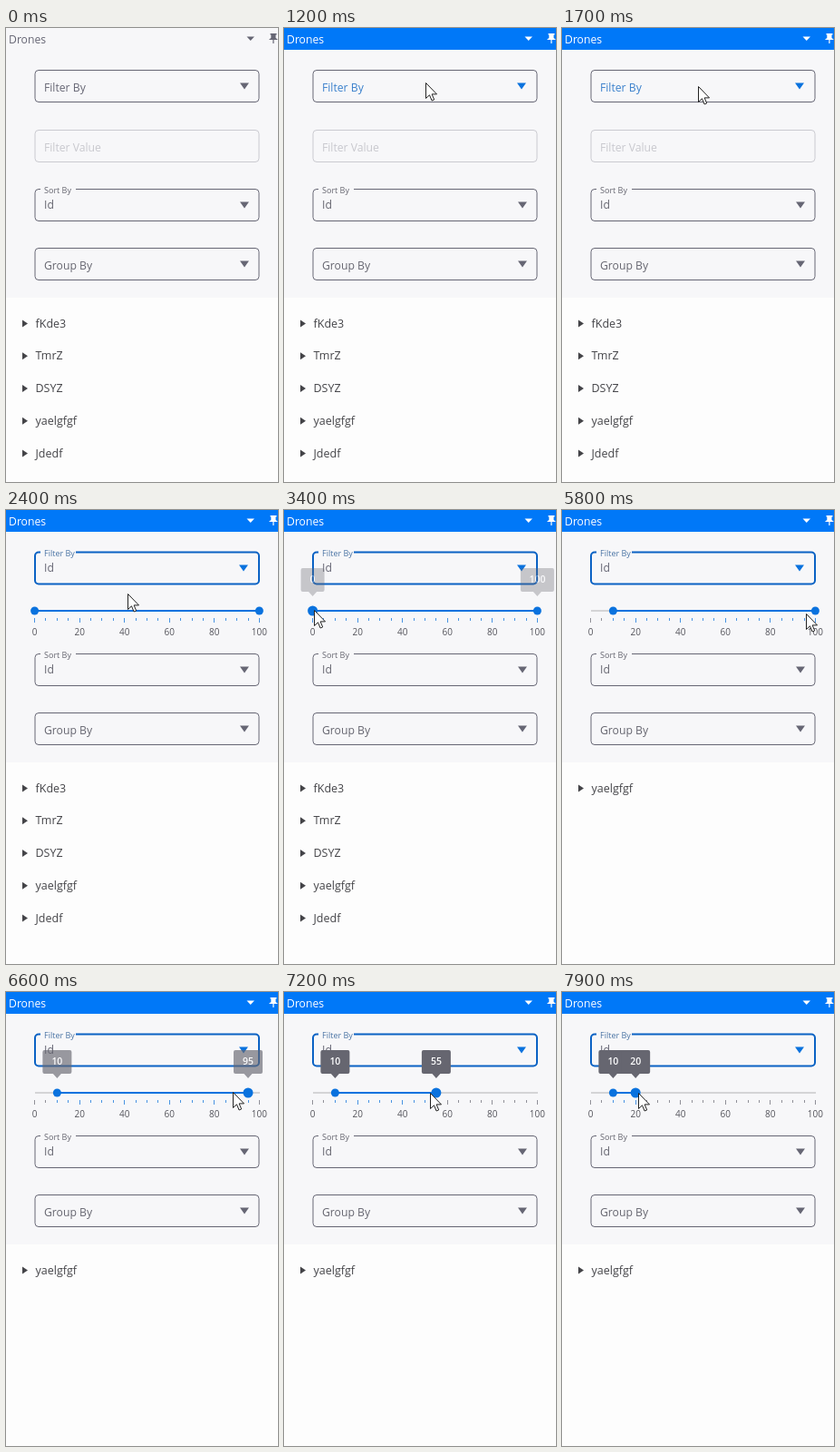
Animation of 300x500 px, one loop 8000 ms. Source, as an HTML page:

```html
<!DOCTYPE html>
<html lang="en">
<head>
<meta charset="utf-8">
<title>Drones panel</title>
<style>
  html, body { margin: 0; width: 100%; height: 100%; overflow: hidden; background: #fdfdfd; }
  svg { display: block; width: 300px; height: 500px; }
  text { font: 12.2px "Open Sans", "Noto Sans", sans-serif; fill: #666670; }
  .small { font-size: 9px; }
  .axis { font-size: 10px; text-anchor: middle; fill: #55555c; }
  .tip text { font-size: 10.5px; font-weight: 600; text-anchor: middle; fill: #fff; }
  .tree text { font-size: 12.5px; }
  .tree text, .tree path { fill: #444448; }
</style>
</head>
<body>
<svg id="stage" viewBox="0 0 300 500"></svg>
<script>
const LOOP = 8000, STEP = 100;
const BLUE = '#0078f8', ACCENT = '#0a72de', INK = '#666674', PANEL = '#f7f7f9';
const stage = document.getElementById('stage');

function add(parent, tag, attrs = {}, content = '') {
  const el = document.createElementNS('http://www.w3.org/2000/svg', tag);
  parent.append(el);
  el.textContent = content;
  return set(el, attrs);
}
function set(el, attrs) {
  for (const key in attrs) el.setAttribute(key, attrs[key]);
  return el;
}
const show = (el, on) => el.setAttribute('visibility', on ? 'visible' : 'hidden');
const moveTo = (el, x, y) => el.setAttribute('transform', `translate(${x} ${y})`);

// Rows are [time, value, ...], linear in between.
function track(rows, t) {
  const i = rows.findIndex(row => row[0] > t);
  if (i === 0) return rows[0].slice(1);
  if (i < 0) return rows[rows.length - 1].slice(1);
  const a = rows[i - 1], b = rows[i], k = (t - a[0]) / (b[0] - a[0]);
  return a.slice(1).map((v, n) => v + (b[n + 1] - v) * k);
}

const cursorPath = [
  [100, 285, 458], [500, 200, 150], [700, 198, 145], [1200, 157, 61],
  [1800, 150, 66], [2200, 138, 90], [2400, 135, 93],
  [3200, 34, 111], [3900, 34, 111], [4300, 45, 112], [4400, 47, 112],
  [4700, 57, 113], [5000, 57, 113], [5800, 270, 115], [6000, 279, 113],
  [6400, 278, 112], [6600, 251, 111], [7700, 87, 112], [7900, 85, 112]
];
const highPath = [[6500, 100], [6600, 95], [7000, 75], [7600, 20]];
const tipFade = [[3300, 0], [3600, 1], [5000, 1], [5300, 0], [6400, 0], [6600, .65], [6700, 1]];
const names = ['fKde3', 'TmrZ', 'DSYZ', 'yaelgfgf', 'Jdedf'];
const sliderX = value => 31.6 + value * 2.478;

const panel = add(stage, 'rect', { width: 300, fill: PANEL });

const bar = add(stage, 'rect', { width: 300, height: 24, fill: BLUE });
const title = add(stage, 'text', { x: 3, y: 16.5 }, 'Drones');
const icons = add(stage, 'g');
add(icons, 'path', { d: 'M265.5 9.5h8.5l-4.25 4.5z' });
add(icons, 'path', { d: 'M291.5 6h7v1.5h-1V11l2 1.5V13h-4v4h-1.2v-4h-4v-.5l2-1.5V7.5h-.8z' });

function field(caption, value) {
  const g = add(stage, 'g');
  const box = add(g, 'rect', { x: 32, y: .5, width: 247, height: 35, rx: 4, fill: 'none', stroke: INK });
  const gap = add(g, 'rect', { x: 38, y: -2, width: 39, height: 6, fill: PANEL });
  const label = add(g, 'text', { x: 42, y: 4.5, class: 'small' }, caption);
  const text = add(g, 'text', { x: 42, y: 24 }, caption);
  const arrow = add(g, 'path', { d: 'M258 14.5h10l-5 7z', fill: INK });
  const fill = on => {
    show(gap, on);
    show(label, on);
    text.textContent = on ? value : caption;
    text.setAttribute('y', on ? 21.5 : 24);
  };
  fill(false);
  return { g, box, label, text, arrow, fill };
}

const filterBy = field('Filter By', 'Id');
const sortBy = field('Sort By', 'Id');
const groupBy = field('Group By', '');
sortBy.fill(true);
moveTo(filterBy.g, 0, 46);

const filterValue = field('Filter Value', '');
moveTo(filterValue.g, 0, 112);
filterValue.arrow.remove();
set(filterValue.box, { stroke: '#cacad0' });
filterValue.text.style.fill = '#c8c8ce';

const tree = add(stage, 'g', { class: 'tree' });
const rows = names.map((name, i) => {
  const g = add(tree, 'g');
  moveTo(g, 0, i * 35.75);
  add(g, 'path', { d: 'M18 -3.5l6 4-6 4z' });
  return { g, text: add(g, 'text', { x: 32.5, y: 4.5 }, name) };
});

const slider = add(stage, 'g');
add(slider, 'path', { d: 'M32 111H280', stroke: '#d4d4d6', 'stroke-width': 2 });
const range = add(slider, 'path', { stroke: ACCENT, 'stroke-width': 2 });
const ticks = [];
for (let v = 0; v <= 100; v += 5) {
  const major = v % 20 === 0, x = Math.floor(sliderX(v)) + .5;
  ticks.push({ v, el: add(slider, 'path', { d: `M${x} 119v${major ? 5 : 3}` }) });
  if (major) add(slider, 'text', { x: sliderX(v), y: 138, class: 'axis' }, v);
}
const thumbs = [0, 1].map(() => add(slider, 'circle', { cy: 111, fill: ACCENT }));
const tips = [0, 1].map(() => {
  const g = add(slider, 'g', { class: 'tip' });
  return {
    g,
    shape: add(g, 'path', { fill: '#666670' }),
    text: add(g, 'text', { y: 80 })
  };
});

const cursor = add(stage, 'path', {
  d: 'M0 0V17L4 13.3 6.6 19.5 9.2 18.4 6.6 12.4H12Z',
  fill: '#fff', stroke: '#222', 'stroke-width': 1
});

function drawTip(tip, value, opacity) {
  const half = [13, 16, 18.5][String(value).length - 1];
  set(tip.g, { transform: `translate(${sliderX(value)} 0)`, opacity });
  set(tip.shape, {
    d: `M${2 - half} 64H${half - 2}q2 0 2 2V88q0 2-2 2H4.5L0 95-4.5 90H${2 - half}q-2 0-2-2V66q0-2 2-2z`
  });
  tip.text.textContent = value;
}

function drawSlider(t) {
  const low = t < 4200 ? 0 : t < 4700 ? 5 : 10;
  const high = Math.round(track(highPath, t)[0] / 5) * 5;
  const active = t >= 3300 && t < 5100 ? 0 : t >= 6400 ? 1 : -1;
  const opacity = track(tipFade, t)[0];
  set(range, { d: `M${sliderX(low)} 111H${sliderX(high)}` });
  for (const { v, el } of ticks) {
    el.setAttribute('stroke', v >= low && v <= high ? '#4a94e2' : '#909098');
  }
  [low, high].forEach((value, i) => {
    set(thumbs[i], { cx: sliderX(value), r: i === active ? 5.5 : 4.5 });
    drawTip(tips[i], value, opacity);
  });
}

function render(t) {
  const focused = t >= 700, chosen = t >= 2200, sliding = t >= 2400;
  const hover = t >= 1100 && !chosen;

  show(bar, focused);
  title.style.fill = focused ? '#fff' : INK;
  icons.setAttribute('fill', focused ? '#fff' : INK);

  filterBy.fill(chosen);
  set(filterBy.box, { stroke: chosen ? '#0b62c4' : INK, 'stroke-width': chosen ? 2 : 1 });
  filterBy.arrow.setAttribute('fill', chosen || hover ? ACCENT : INK);
  moveTo(filterBy.arrow, chosen || hover ? -1 : 0, 0);
  filterBy.text.style.fill = hover ? '#3a80cc' : INK;
  filterBy.label.style.fill = chosen ? '#4a74a4' : INK;

  filterValue.g.setAttribute('display', sliding ? 'none' : 'inline');
  slider.setAttribute('display', sliding ? 'inline' : 'none');
  moveTo(sortBy.g, 0, sliding ? 158 : 177);
  moveTo(groupBy.g, 0, sliding ? 223 : 242);
  moveTo(tree, 0, sliding ? 306 : 325);
  panel.setAttribute('height', sliding ? 278 : 297);

  const items = t < 4200 ? names : t < 4700 ? names.slice(2, 4) : names.slice(3, 4);
  rows.forEach((row, i) => {
    show(row.g, i < items.length);
    row.text.textContent = items[i] || '';
  });

  drawSlider(t);
  show(cursor, t >= 100);
  const [x, y] = track(cursorPath, t);
  moveTo(cursor, Math.round(x) - .5, Math.round(y) - .5);
}

const start = performance.now();
function frame() {
  const t = (performance.now() - start) % LOOP;
  render(Math.floor(t / STEP) * STEP);
  requestAnimationFrame(frame);
}
frame();
</script>
</body>
</html>
```
